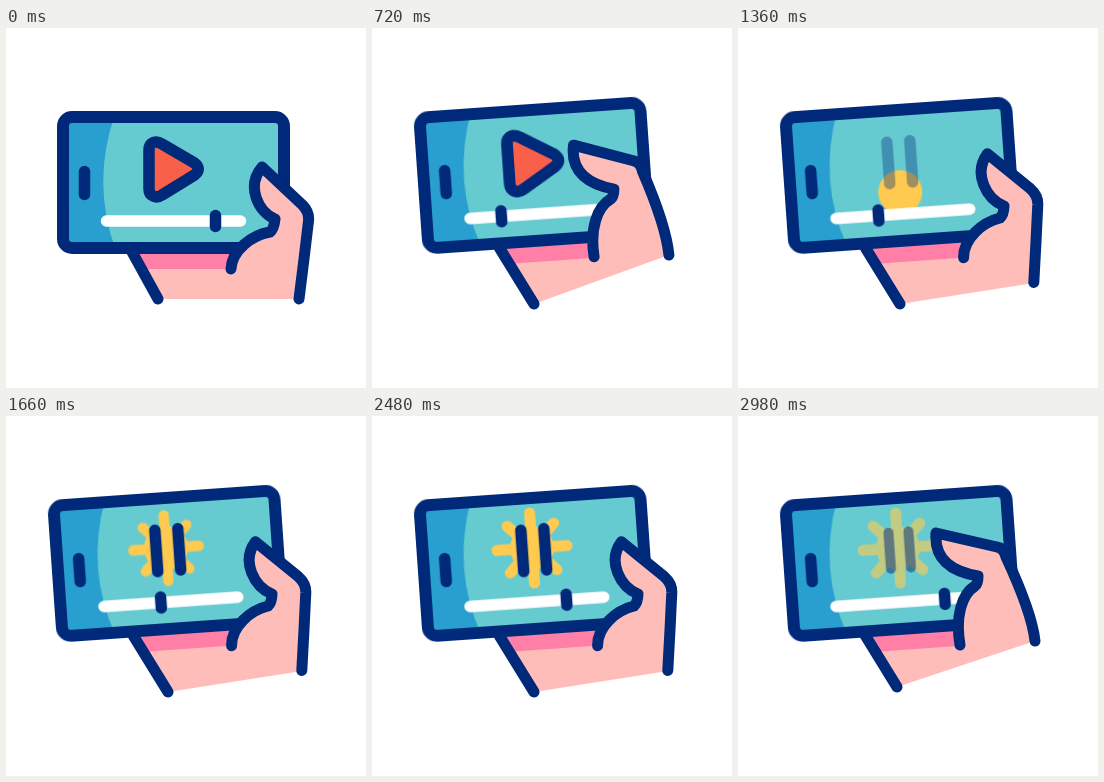
An HTML page that plays this animation: 360x360 px, repeating every 3 s.

```html
<!DOCTYPE html>
<html lang="en">
<head>
<meta charset="utf-8">
<title>Phone video player</title>
<style>
:root {
  --navy: #00297a;
  --thumb-flat: path("M225 241 C226 222 246 207 264 204 Q268 201 269 191 C252 184 240 158 256 139 L296.5 177 Q303.5 184 302.5 193 Q298 232 293 271");
  --thumb-rest: path("M225.6 229.7 C225.3 210.6 244.2 194.3 262 190 Q265.7 186.8 266 178 C248.6 170.9 234.7 145.8 249.4 125.7 L292.5 160.8 Q300 167.3 299.8 176.4 Q298 215.6 295.8 254.5");
  --thumb-reach: path("M223 227 C223 206 236 188 254 181 Q259 178 259.5 172 C238 165 217 147 234.5 119 L284 149 Q291.5 153 292.5 161 Q293.5 200 296.3 245");
  --thumb-lift: path("M222 229 C219 204 226 181 244 173 Q247 171 246.5 162 C222 156 203 142 210.5 117 L267 136 Q274 138 276 146 Q292 197 297 232");
  --thumb-press: path("M222 229 C217 200 224 178 237 170 Q240 168 240 160 C216 156 196 145 198 117 L259 131 Q266 132 268 141 Q294 197 297 225");
}
html, body { margin: 0; width: 100%; height: 100%; overflow: hidden; background: #fff; }
svg { display: block; width: 100vw; height: 100vh; }
.line { fill: none; stroke: var(--navy); stroke-width: 11.5; stroke-linecap: round; stroke-linejoin: round; }
.skin { fill: #ffbdb9; }
.sun { fill: #ffca50; stroke: #ffca50; stroke-linecap: round; }

.tilt, .play, .pause, .sun, .rays, .knob, .palm, .wrist, .thumb {
  animation: 3s linear infinite;
}
.tilt { transform-origin: 167.5px 154.5px; animation-name: tilt; }
.play, .pause { transform-origin: 167.5px 141px; }
.play { animation-name: play; }
.pause { animation-name: pause; }
.sun { animation-name: sun; }
.rays { transform-origin: 166.4px 139px; animation-name: rays; }
.knob { animation-name: knob; }
.palm { animation-name: palm; }
.wrist { animation-name: wrist; }
.thumb { animation-name: thumb; }

@keyframes tilt {
  0% { transform: translate(0, 0) rotate(0deg); animation-timing-function: ease-in-out; }
  14.3%, 100% { transform: translate(-5.3px, -7.1px) rotate(-4deg); }
}
@keyframes knob {
  0% { transform: translateX(0); animation-timing-function: ease-in-out; }
  25.3%, 37.4% { transform: translateX(-78px); }
  91.2%, 100% { transform: translateX(0); }
}
@keyframes play {
  0% { opacity: 1; transform: scale(1); }
  15%, 29.3% { opacity: 1; transform: scale(1.02); }
  36.2%, 100% { opacity: 0; transform: scale(.78); }
}
@keyframes pause {
  0%, 42.7% { opacity: 0; transform: scale(1); }
  50%, 95.3% { opacity: 1; transform: scale(1); }
  100% { opacity: .44; transform: scale(.85); }
}
@keyframes sun {
  0%, 37.3% { opacity: 1; transform: translateY(110px); animation-timing-function: ease-in-out; }
  50.2%, 95.3% { opacity: 1; transform: translateY(0); }
  100% { opacity: .55; transform: translateY(0); }
}
@keyframes rays {
  0%, 48% { transform: scale(.4); animation-timing-function: ease-out; }
  58%, 100% { transform: scale(1); }
}
@keyframes thumb {
  0% { d: var(--thumb-flat); animation-timing-function: cubic-bezier(.5, 0, .8, .8); }
  15.33% { d: var(--thumb-reach); animation-timing-function: cubic-bezier(.2, .3, .5, 1); }
  28% { d: var(--thumb-press); animation-timing-function: ease-in; }
  33.33% { d: var(--thumb-lift); animation-timing-function: ease-out; }
  44%, 84.5% { d: var(--thumb-rest); animation-timing-function: ease-in-out; }
  98%, 100% { d: var(--thumb-press); }
}
@keyframes palm {
  0% { d: path("M125 222 L152 271 L293 271 L264 204Z"); animation-timing-function: cubic-bezier(.5, 0, .8, .8); }
  15.33% { d: path("M127.5 220 L162 276 L296 246 L254 181Z"); animation-timing-function: cubic-bezier(.2, .3, .5, 1); }
  28% { d: path("M127.5 220 L162 276 L297 225 L237 170Z"); animation-timing-function: ease-in; }
  33.33% { d: path("M127.5 220 L162 276 L297 232 L244 173Z"); animation-timing-function: ease-out; }
  44%, 84.5% { d: path("M127.5 220 L162 276 L296 255 L262 190Z"); animation-timing-function: ease-in-out; }
  98%, 100% { d: path("M127 219 L159 271 L297 225 L237 170Z"); }
}
@keyframes wrist {
  0% { d: path("M125 222 L152 271"); animation-timing-function: cubic-bezier(.5, 0, .8, .8); }
  15.33%, 84.5% { d: path("M127.5 220 L162 276"); animation-timing-function: ease-in-out; }
  98%, 100% { d: path("M127 219 L159 271"); }
}
</style>
</head>
<body>
<svg viewBox="0 0 360 360">
  <defs>
    <clipPath id="screen"><rect x="57" y="89" width="221" height="131" rx="9"/></clipPath>
  </defs>

  <path class="palm skin" d="M125 222 L152 271 L293 271 L264 204Z"/>
  <g class="tilt">
    <path fill="#ff7fa6" d="M120 215 L137 241 H223 L230 215Z"/>
  </g>
  <path class="wrist line" style="stroke-width:11" d="M125 222 L152 271"/>

  <g class="tilt">
    <g clip-path="url(#screen)">
      <rect x="57" y="89" width="221" height="131" fill="#66cbd0"/>
      <path fill="#289fcf" d="M57 89 H108 Q86 155 109 220 H57Z"/>
      <g class="sun">
        <circle cx="166.4" cy="139" r="22" stroke="none"/>
        <path class="rays" stroke-width="11" d="M166.4 104 V174 M131.4 139 H201.4 M143.1 115.7 L189.7 162.3 M143.1 162.3 L189.7 115.7"/>
      </g>
    </g>
    <path class="pause line" d="M156.5 120.5 V162 M179.5 120.5 V162"/>
    <path class="play line" style="fill:#f9604a" d="M143 122 C143 114 150 112 156 116 L188.5 135 C193.5 139 193.5 143 188.5 147 L156 167 C150 171 143 168 143 161Z"/>
    <path class="line" style="stroke:#fff" d="M100.5 193 H234.5"/>
    <path class="knob line" d="M209.5 187.5 V198.5"/>
    <path class="line" d="M78.5 143.5 V166.5"/>
    <rect class="line" x="57" y="89" width="221" height="131" rx="9" style="stroke-width:12"/>
  </g>

  <path class="thumb skin line" style="fill:#ffbdb9;stroke-width:11" d="M225 241 C226 222 246 207 264 204 Q268 201 269 191 C252 184 240 158 256 139 L296.5 177 Q303.5 184 302.5 193 Q298 232 293 271"/>
</svg>
</body>
</html>
```
